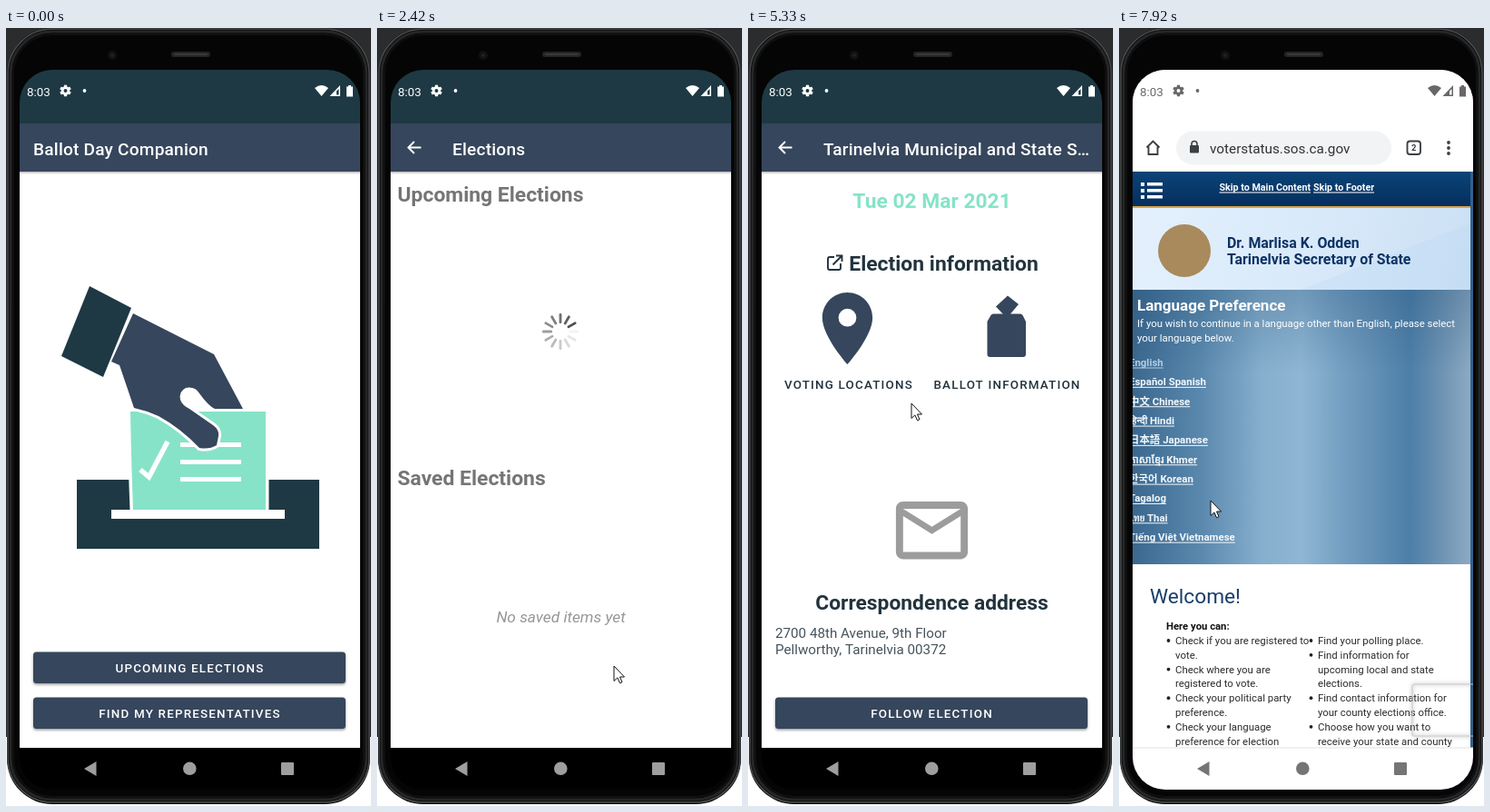
An HTML page with a canvas for the animation above (8 s loop, 402 by 856 pixels).

```html
<!DOCTYPE html>
<html lang="en">
<head>
<meta charset="utf-8">
<title>Election app</title>
<style>
html, body { margin: 0; width: 100%; height: 100%; overflow: hidden; background: #111; }
canvas { display: block; width: 100vw; height: 100vh; }
</style>
</head>
<body>
<canvas id="stage"></canvas>
<script>
const W = 402, H = 856, LOOP = 8000;
const canvas = document.getElementById('stage');
const g = canvas.getContext('2d');
const ratio = window.devicePixelRatio || 1;
canvas.width = W * ratio;
canvas.height = H * ratio;

const TEAL = '#1e3943', SLATE = '#36465c', MINT = '#86e3c8', INK = '#22333d';
const SCREEN = { x: 15, y: 46, w: 375, h: 792 };
const CX = 202.5, CY = 442;
const FONTS = 'Roboto, "Noto Sans", "Noto Sans CJK SC", sans-serif';

// Moments of the story, in ms
const TO_LIST = 1710, LOADED = 3100, TO_DETAIL = 4790, SLIDE = 400;
const TO_WEB = 6960, WEB_SLIDE = 357, WEB_GROW = 7250, PAGE = 7670;

const clamp = v => Math.max(0, Math.min(1, v));
const span = (t, a, d) => clamp((t - a) / d);
const smooth = u => (1 - Math.cos(Math.PI * u)) / 2;
const inOut = u => u < .5 ? 4 * u ** 3 : 1 - 4 * (1 - u) ** 3;

function rect(x, y, w, h, c) {
  g.fillStyle = c;
  g.fillRect(x, y, w, h);
}

function round(x, y, w, h, r, c) {
  g.beginPath();
  g.roundRect(x, y, w, h, r);
  g.fillStyle = c;
  g.fill();
}

function disc(x, y, r, c) {
  g.beginPath();
  g.arc(x, y, r, 0, 7);
  g.fillStyle = c;
  g.fill();
}

function shape(d, c, x = 0, y = 0, s = 1) {
  g.save();
  g.translate(x, y);
  g.scale(s, s);
  g.fillStyle = c;
  g.fill(new Path2D(d), 'evenodd');
  g.restore();
}

function line(d, c, w) {
  g.strokeStyle = c;
  g.lineWidth = w;
  g.stroke(new Path2D(d));
}

function text(s, x, y, size, color, { weight = 400, align = 'left', gap = 0, style = '', under = false } = {}) {
  g.font = `${style} ${weight} ${size}px ${FONTS}`;
  g.letterSpacing = gap + 'px';
  g.textAlign = align;
  g.fillStyle = color;
  g.fillText(s, x, y);
  if (under) g.fillRect(x, y + 1.5, g.measureText(s).width, 1);
}

function gradient(x0, y0, x1, y1, stops) {
  const f = g.createLinearGradient(x0, y0, x1, y1);
  stops.forEach(([p, c]) => f.addColorStop(p, c));
  return f;
}

function button(label, y) {
  g.save();
  g.shadowColor = 'rgba(0,0,0,.4)';
  g.shadowBlur = 3;
  g.shadowOffsetY = 1.5;
  round(30, y - .5, 344, 34.5, 3.5, SLATE);
  g.restore();
  text(label, CX, y + 22, 13.4, '#fff', { weight: 500, align: 'center', gap: 1.2 });
}

function phone() {
  rect(0, 0, W, H, '#2b2c2e');
  rect(0, 780, W, 76, '#fff');
  round(1, 0, 400, 854, 50, '#050505');
  const ring = (i, r, c, w) => {
    g.beginPath();
    g.roundRect(i, i - 1, W - 2 * i, 855 - 2 * i, r);
    g.strokeStyle = c;
    g.lineWidth = w;
    g.stroke();
  };
  ring(2, 49, '#4c4f51', 1.5);
  ring(5, 46, '#252627', 3);
  ring(8, 43, '#101010', 2);
  round(182, 26, 43, 6, 3, '#242424');
  round(185, 28, 37, 2, 1, '#3a3a3a');
  disc(117, 30, 5, '#101214');
  disc(117, 30, 2, '#1d2226');
}

function statusIcons(c) {
  text('8:03', 23, 74.5, 13.4, c);
  g.save();
  g.translate(65.5, 69);
  for (let i = 0; i < 6; i++) {
    rect(-1.6, -6.3, 3.2, 4, c);
    g.rotate(Math.PI / 3);
  }
  g.beginPath();
  g.arc(0, 0, 3.4, 0, 7);
  g.strokeStyle = c;
  g.lineWidth = 2.8;
  g.stroke();
  g.restore();
  disc(86.5, 69, 1.9, c);
  shape('M340 66Q347.500 60 355 66L347.500 75Z', c);
  shape('M356.500 75L368 63V75ZM364 73.500H366.500V67L364 69.600Z', c);
  shape('M375 64.500H377V63H380V64.500H382V75.500H375Z', c);
}

function navIcons(c) {
  shape('M86 815L99.500 807V823Z', c);
  disc(202.3, 814.8, 7.3, c);
  round(303, 808, 14, 14, 1, c);
}

function home() {
  const hand = new Path2D('M140 314L229 359L261 419H230Q223 416 213 402Q208 394 198 396Q190 400 192 409Q194 415 202 419L228 437Q235 442 234 449L232 459Q224 464 213 462Q192 440 168 427Q155 421 141 418L125 371L116 367Z');
  rect(78, 497, 267, 76, TEAL);
  const card = new Path2D('M137 422L286 422V530H140Q138 480 137 422Z');
  g.strokeStyle = '#fff';
  g.lineWidth = 7;
  g.stroke(card);
  g.fillStyle = MINT;
  g.fill(card);
  line('M148 486L157.500 494L178 455', '#fff', 5.5);
  for (const y of [458.5, 477.5, 496.5]) rect(192, y - 2.5, 67, 5, '#fff');
  g.strokeStyle = '#fff';
  g.lineWidth = 6;
  g.stroke(hand);
  g.fillStyle = SLATE;
  g.fill(hand);
  shape('M92 284L138 308L107 384L61 361Z', TEAL);
  rect(116, 530, 191, 10, '#fff');
  button('UPCOMING ELECTIONS', 687);
  button('FIND MY REPRESENTATIVES', 737);
}

function spinner(t) {
  const head = (Math.floor(t / 100) + 2) % 12;
  g.save();
  g.translate(202, 334);
  for (let i = 0; i < 12; i++) {
    const age = (head - i + 12) % 12;
    g.save();
    g.rotate(i * Math.PI / 6);
    round(-1.4, -20, 2.8, 11, 1.2, `rgba(50,50,50,${.86 * (1 - age / 12) ** 1.1})`);
    g.restore();
  }
  g.restore();
}

const VOTES = [
  ['ZIV Trial Election', 'Sun 06 Jun 2021'],
  ['Ormhaven Election', 'Tue 02 Mar 2021'],
  ['Norwena State Senate Election', 'Tue 02 Mar 2021'],
  ['Quilla Haven Election', 'Tue 02 Mar 2021'],
  ['Tarinelvia Municipal and State Senate Electi…', 'Tue 02 Mar 2021']
];

function list(t) {
  const head = { weight: 700 };
  text('Upcoming Elections', 22.5, 191, 22.9, '#757575', head);
  text('Saved Elections', 22.5, 503, 22.9, '#757575', head);
  text('No saved items yet', CX, 653.5, 17.3, '#979797', { style: 'italic', align: 'center' });
  if (t < LOADED) return spinner(t);
  VOTES.forEach(([name, date], i) => {
    const y = 204 + 47.7 * i;
    if (i % 2 === 0) rect(22, y, 361, 47.7, '#eff9f6');
    text(name, 22.5, y + 18.5, 17.2, INK, head);
    text(date, 22.5, y + 40, 15.2, '#4d5a62');
  });
}

function detail() {
  const mid = { weight: 700, align: 'center' };
  const label = { weight: 500, align: 'center', gap: 1.2 };
  text('Tue 02 Mar 2021', CX, 198, 22.8, MINT, mid);
  line('M95 252H90Q88 252 88 254V264Q88 266 90 266H100Q102 266 102 264V259M97 250.500H103.500V257M103 251L93.500 260.500', INK, 1.9);
  text('Election information', 111.3, 267, 22.9, INK, { weight: 700 });
  shape('M12 2C8.130 2 5 5.130 5 9c0 5.250 7 13 7 13s7-7.750 7-13c0-3.870-3.130-7-7-7zM14.500 9A2.500 2.500 0 1 1 9.500 9A2.500 2.500 0 1 1 14.500 9Z', SLATE, 62.1, 283.1, 3.95);
  shape('M273 306.500L286 294.500L298 304L287 317H283Z', SLATE);
  shape('M270 314.500H300Q301.500 314.500 302.500 316L306 323V359Q306 362 303 362H266.500Q263.500 362 263.500 359V323L267.500 316Q268.500 314.500 270 314.500Z', SLATE);
  text('VOTING LOCATIONS', 111, 396.5, 13.4, INK, label);
  text('BALLOT INFORMATION', 285.5, 396.5, 13.4, INK, label);
  shape('M22 6c0-1.100-.9-2-2-2H4c-1.100 0-2 .9-2 2v12c0 1.100.9 2 2 2h16c1.100 0 2-.9 2-2V6zm-2 0l-8 5-8-5h16zm0 12H4V8l8 5 8-5v10z', '#9c9c9c', 155, 505.2, 3.96);
  text('Correspondence address', CX, 640, 22.8, INK, mid);
  text('2700 48th Avenue, 9th Floor', 30, 671, 15.2, '#46535b');
  text('Pellworthy, Tarinelvia 00372', 30, 689, 15.2, '#46535b');
  button('FOLLOW ELECTION', 737);
}

function app(t) {
  rect(15, 46, 375, 792, '#000');
  rect(15, 158, 375, 634, '#fff');
  g.save();
  g.beginPath();
  g.rect(15, 158, 375, 634);
  g.clip();
  const pos = smooth(span(t, TO_LIST, SLIDE)) + smooth(span(t, TO_DETAIL, SLIDE));
  [home, list, detail].forEach((draw, i) => {
    const dx = (i - pos) * SCREEN.w;
    if (Math.abs(dx) >= SCREEN.w) return;
    g.save();
    g.translate(dx, 0);
    draw(t);
    g.restore();
  });
  g.restore();

  rect(15, 158, 375, 3, gradient(0, 158, 0, 161, [[0, 'rgba(0,0,0,.28)'], [1, 'rgba(0,0,0,0)']]));
  rect(15, 46, 375, 59, TEAL);
  rect(15, 105, 375, 53, SLATE);
  const bar = { weight: 500, gap: .2 };
  if (t < TO_LIST) return text('Ballot Day Companion', 30, 139.5, 19.1, '#fff', bar);
  line('M48.500 131.500H35M41 125L34.500 131.500L41 138', '#fff', 1.9);
  text(t < TO_DETAIL ? 'Elections' : 'Tarinelvia Municipal and State S…', 83, 139.5, 19.1, '#fff', bar);
}

const LANGUAGES = ['English', 'Español Spanish', '中文 Chinese', 'हिन्दी Hindi', '日本語 Japanese',
  'ភាសាខ្មែរ Khmer', '한국어 Korean', 'Tagalog', 'ไทย Thai', 'Tiếng Việt Vietnamese'];

// A leading star marks a new bullet
const LEFT = ['*Check if you are registered to', 'vote.', '*Check where you are', 'registered to vote.',
  '*Check your political party', 'preference.', '*Check your language', 'preference for election'];
const RIGHT = ['*Find your polling place.', '*Find information for', 'upcoming local and state', 'elections.',
  '*Find contact information for', 'your county elections office.', '*Choose how you want to', 'receive your state and county'];

function bullets(rows, x) {
  rows.forEach((row, i) => {
    const y = 678 + 15.8 * i;
    if (row[0] === '*') disc(x - 7.5, y - 4, 1.9, '#222');
    text(row.replace('*', ''), x, y, 11.4, '#2b2b2b');
  });
}

function page() {
  g.save();
  g.beginPath();
  g.rect(15, 158, 375, 634);
  g.clip();
  rect(15, 158, 375, 634, '#fff');
  rect(15, 158, 375, 38, gradient(0, 158, 0, 196, [[0, '#0b4377'], [1, '#052f5f']]));
  for (const y of [170, 177, 184]) {
    rect(24, y, 4, 4, '#fff');
    rect(31, y, 17, 3.5, '#fff');
  }
  const link = { weight: 700, under: true };
  text('Skip to Main Content', 110.5, 179, 10.7, '#fff', link);
  text('Skip to Footer', 214, 179, 10.7, '#fff', link);
  rect(15, 196, 375, 2, '#d9a343');

  rect(15, 198, 375, 90, gradient(15, 198, 387, 288, [[0, '#e4f0fc'], [.5, '#d9eafa'], [1, '#cbe0f4']]));
  shape('M200 288L387 215V288Z', 'rgba(180,210,238,.25)');
  disc(72, 245, 29, '#a98a5c');
  text('Dr. Marlisa K. Odden', 119, 241.5, 15.9, '#0c3264', { weight: 700 });
  text('Tarinelvia Secretary of State', 119, 260, 15.9, '#0c3264', { weight: 700 });

  rect(15, 288, 375, 302, gradient(15, 0, 387, 0,
    [[0, '#3b688f'], [.2, '#5a88ad'], [.38, '#86aecd'], [.5, '#8fb6d3'], [.62, '#759fc2'], [.82, '#4d7fa8'], [1, '#38699390']]));
  rect(15, 288, 375, 302, gradient(0, 288, 0, 590, [[0, 'rgba(30,75,115,.28)'], [.3, 'rgba(30,75,115,0)']]));
  text('Language Preference', 20, 311, 17, '#fff', { weight: 700 });
  text('If you wish to continue in a language other than English, please select', 20, 329, 11.4, '#fff');
  text('your language below.', 20, 345, 11.4, '#fff');
  LANGUAGES.forEach((s, i) => text(s, 11, 372 + 21.35 * i, 11.45, i ? '#f2f7fb' : '#b4cde2', link));

  text('Welcome!', 34, 633, 22.7, '#183f69');
  text('Here you can:', 52, 662, 11.3, '#111', { weight: 700 });
  bullets(LEFT, 62);
  bullets(RIGHT, 219);
  rect(387, 158, 3, 634, '#34618a');
  g.shadowColor = 'rgba(0,0,0,.45)';
  g.shadowBlur = 4;
  g.beginPath();
  g.roundRect(323, 722, 70, 57, 2);
  g.strokeStyle = '#c9c9c9';
  g.lineWidth = 1;
  g.stroke();
  g.restore();
}

function browser(t) {
  const dark = '#3c4043';
  rect(15, 46, 375, 792, '#fff');
  line('M30.500 131.500L37.500 124.500L44.500 131.500M32.500 130.500V139H42.500V130.500', dark, 1.9);
  round(63, 113.5, 237, 37, 18.5, '#f1f3f4');
  round(78, 129, 10, 8.5, 1, dark);
  line('M80 129.500V127.500A3 3 0 0 1 86 127.500V129.500', dark, 1.6);
  text('voterstatus.sos.ca.gov', 100, 137.5, 15.3, '#303336');
  g.beginPath();
  g.roundRect(317.5, 124.5, 14.5, 14.5, 3);
  g.strokeStyle = dark;
  g.lineWidth = 1.9;
  g.stroke();
  text('2', 324.8, 135.3, 9.5, dark, { weight: 700, align: 'center' });
  for (const dy of [-6, 0, 6]) disc(363, 132 + dy, 1.9, dark);
  if (t < PAGE) {
    const done = .7 + .3 * span(t, 7350, PAGE - 7350);
    rect(15, 156.5, 375, 2.4, '#c6dafc');
    rect(15, 156.5, 375 * done, 2.4, '#2a66cf');
  } else {
    page();
  }
  rect(15, 791.5, 375, 1, '#e2e2e2');
}

function wallpaper() {
  rect(15, 46, 375, 792, gradient(0, 46, 0, 838,
    [[0, '#f2a6d2'], [.45, '#ee9cca'], [.6, '#dd76b2'], [.72, '#b8458f'], [.83, '#8c2678'], [1, '#4a1260']]));
  shape('M15 718L34 711L120 735L210 716L300 742L390 720V838H15Z', gradient(0, 712, 0, 838, [[0, '#3a1463'], [.3, '#2a0a50'], [1, '#21003a']]));
}

function frame(scale, dx, draw, t) {
  g.save();
  g.translate(CX + dx, CY);
  g.scale(scale, scale);
  g.translate(-CX, -CY);
  g.beginPath();
  g.rect(SCREEN.x, SCREEN.y, SCREEN.w, SCREEN.h);
  g.clip();
  draw(t);
  g.restore();
}

// Time, x and y of the pointer's stops
const STOPS = [[900, 410, 800], [1400, 261, 702], [3500, 261, 702], [4300, 180, 413],
  [5900, 180, 413], [6500, 108, 351], [7420, 108, 351], [7900, 101, 520]];

function pointer(t) {
  if (t < STOPS[0][0]) return;
  let [, x, y] = STOPS[STOPS.length - 1];
  for (let i = 1; i < STOPS.length; i++) {
    const [a, ax, ay] = STOPS[i - 1], [b, bx, by] = STOPS[i];
    if (t >= a && t < b) {
      const u = smooth((t - a) / (b - a));
      x = ax + (bx - ax) * u;
      y = ay + (by - ay) * u;
    }
  }
  g.save();
  g.translate(x, y);
  const d = 'M0 0V16.500L3.900 12.900L6.500 18.800L9 17.700L6.500 12H11.500Z';
  shape(d, '#fff');
  line(d, '#111', 1);
  g.restore();
}

function draw(t) {
  g.setTransform(canvas.width / W, 0, 0, canvas.height / H, 0, 0);
  phone();
  g.save();
  g.beginPath();
  g.roundRect(SCREEN.x, SCREEN.y, SCREEN.w, SCREEN.h, 36);
  g.clip();
  if (t < TO_WEB) {
    app(t);
  } else {
    const e = inOut(span(t, TO_WEB, WEB_SLIDE)), far = SCREEN.w * 1.05;
    wallpaper();
    if (e < 1) frame(1 - .048 * smooth(span(t, TO_WEB, 120)), -far * e, app, t);
    frame(.952 + .048 * smooth(span(t, WEB_GROW, 200)), far * (1 - e), browser, t);
  }
  const web = t > TO_WEB + WEB_SLIDE / 2;
  statusIcons(web ? (t < 7330 ? '#8a8389' : '#686868') : '#fff');
  navIcons(web && t > 7330 ? '#757575' : '#9e9e9e');
  g.restore();
  pointer(t);
}

const start = performance.now();
function tick() {
  draw((performance.now() - start) % LOOP);
  requestAnimationFrame(tick);
}
tick();
</script>
</body>
</html>
```
